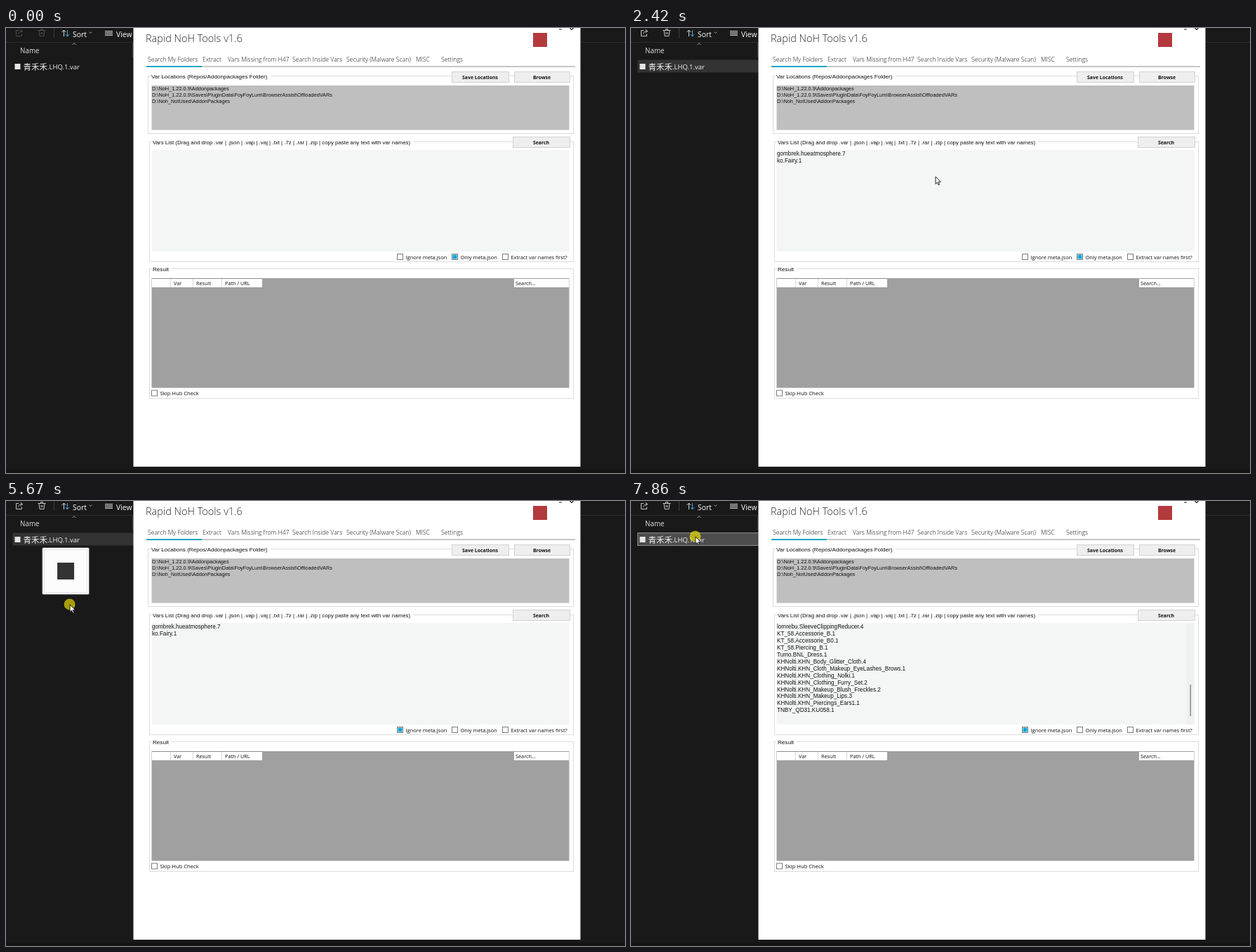
An HTML page for the animation above (8 s loop, 882 by 635 pixels).

```html
<!DOCTYPE html>
<html lang="en">
<head>
<meta charset="utf-8">
<title>Var search</title>
<style>
html, body { margin: 0; width: 100%; height: 100%; overflow: hidden; background: #191919; }
svg { display: block; width: 882px; height: 635px; }
text { white-space: pre; }
.ui { font-family: "Open Sans", "Noto Sans", sans-serif; }
.thin { font-family: "Open Sans", "Noto Sans", sans-serif; font-weight: 300; }
.bold { font-family: "Open Sans", "Noto Sans", sans-serif; font-weight: 700; }
.sans { font-family: "Liberation Sans", Arial, sans-serif; }
.cjk { font-family: "Noto Sans CJK SC", "Noto Sans CJK", "Noto Sans CJK JP", sans-serif; }
</style>
</head>
<body>
<svg id="stage" viewBox="0 0 882 635"></svg>
<script>
const LOOP = 8000;
const stage = document.getElementById('stage');

function add(tag, attrs, parent = stage) {
  const el = document.createElementNS('http://www.w3.org/2000/svg', tag);
  for (const k in attrs) el.setAttribute(k, attrs[k]);
  parent.appendChild(el);
  return el;
}
const rect = (x, y, width, height, fill, more, parent) =>
  add('rect', { x, y, width, height, fill, ...more }, parent);
const line = (d, stroke, width = 1, parent) =>
  add('path', { d, stroke, 'stroke-width': width, fill: 'none' }, parent);
function text(x, y, str, size, cls, fill = '#111', more, parent) {
  const el = add('text', { x, y, 'font-size': size, class: cls, fill, ...more }, parent);
  el.textContent = str;
  return el;
}
const show = (el, on) => el.setAttribute('visibility', on ? 'visible' : 'hidden');

// File manager
rect(0, 0, 882, 635, '#191919');
rect(0, 630, 882, 5, '#141414');
line('M818 20.5H882M0 20.5H182', '#2a2a2a');
line('M68.5 0V14M180.5 21V42', '#3c3c3c');
const tools = add('g', { fill: 'none', 'stroke-width': 1 });
add('path', { d: 'M18 3.5H14.5V11.5H22.5V8.5M17.5 8.5Q18 4.5 23.5 4.5M20.5 2L23.5 4.5L20.5 7' }, tools);
add('path', { d: 'M45.5 3.5H56.5M47 3.5L48 11.5H54L55 3.5M49.5 3V1.5H52.5V3M50 6V9M52 6V9' }, tools);
line('M82.5 12V3M79.5 6L82.5 3L85.5 6', '#d8d8d8');
line('M87.5 3V12M84.8 9L87.5 12L90.2 9', '#4aa3e0');
line('M118.5 5.5L120.5 7.5L122.5 5.5M94.5 24L97 21.5L99.5 24', '#a0a0a0');
line('M141 4.5H152M141 6.5H152M141 8.5H152M141 10.5H152', '#d0d0d0');
text(95, 12.5, 'Sort', 10.4, 'ui', '#fff');
text(157, 12.5, 'View', 10.4, 'ui', '#fff');
text(20, 36, 'Name', 9.9, 'ui', '#dedede');
const row = rect(9.5, 45.5, 175, 18, '#333');
rect(12.5, 51, 8, 8, '#e6e6e6');
text(24.5, 59.5, '青禾禾', 11.5, 'cjk', '#f2f2f2');
text(59, 59.3, '.LHQ.1.var', 9.5, 'ui', '#f2f2f2');

// Application window
rect(181.5, 0, 637, 626, '#fff');
text(199, 20, 'Rapid NoH Tools v1.6', 14.5, 'thin', '#222');
rect(751, 7, 20, 20, '#b3393d');
line('M788 2H792M803.5 0L806 2.5L808.5 0', '#222', 1.2);
const tabs = [[202, 'Search My Folders'], [280, 'Extract'], [316, 'Vars Missing from H47'],
  [408, 'Search Inside Vars'], [485, 'Security (Malware Scan)'], [584, 'MISC'], [620, 'Settings']];
for (const [x, name] of tabs) text(x, 47.6, name, 8.7, 'thin', '#111');
rect(200, 54, 611, 2, '#c6c6c6');
rect(200, 54, 79, 2, '#14a5c4');

function group(x, y, w, h, label, labelWidth, size = 8.1) {
  rect(x + .5, y + .5, w, h, 'none', { stroke: '#dcdcdc' });
  rect(x + 4, y - 4, labelWidth, 9, '#fff');
  text(x + 5, y + 4, label, size, 'sans');
}
function button(x, y, w, label) {
  rect(x + .5, y + .5, w, 15, '#eeeeee', { stroke: '#d2d2d2' });
  text(x + w / 2, y + 11.3, label, 6.9, 'bold', '#111', { 'text-anchor': 'middle' });
}
function checkbox(x, y, label, size) {
  const box = rect(x + .5, y + .5, 8, 8, '#fff', { stroke: '#7a7a7a' });
  const mark = rect(x + 1.5, y + 1.5, 6, 6, '#0da7d8');
  const name = text(x + 12.5, y + 7.6, label, size, 'ui');
  return (on, hover = false) => {
    show(mark, on);
    box.setAttribute('stroke', hover ? '#444' : '#7a7a7a');
    name.setAttribute('fill', hover ? '#a0a0a0' : '#111');
  };
}

group(202, 68, 606, 82, 'Var Locations (Repos/Addonpackages Folder)', 171);
rect(207.5, 82, 595, 63.5, '#bfbfbf');
['D:\\NoH_1.22.0.9\\Addonpackages',
 'D:\\NoH_1.22.0.9\\Saves\\PluginData\\FoyFoyLum\\BrowserAssist\\OffloadedVARs',
 'D:\\Noh_NotUsed\\AddonPackages'
].forEach((s, i) => text(208, 89.4 + i * 8.6, s, 7.36, 'sans'));
button(635, 62, 81, 'Save Locations');
button(724, 62, 79, 'Browse');

group(204, 162, 604, 171, 'Vars List (Drag and drop .var | .json | .vap | .vaj | .txt | .7z | .rar | .zip | copy paste any text with var names)', 372, 7.9);
rect(207.5, 174, 595, 145, '#f4f6f6');
button(722, 155, 81, 'Search');
const ignore = checkbox(557, 322, 'Ignore meta.json', 7.48);
const only = checkbox(635, 322, 'Only meta.json', 7.48);
const extract = checkbox(707, 322, 'Extract var names first?', 7.4);

group(204, 343, 604, 185, 'Result', 28);
rect(207.5, 357, 595, 156.5, '#a0a0a0');
rect(208, 358, 157, 12, '#fff');
line('M234.5 358V370M266.5 358V370M307.5 358V370', '#d8d8d8');
line('M208 357.5H365', '#8c8c8c');
[[239, 'Var'], [271, 'Result'], [312, 'Path / URL']].forEach(([x, s]) => text(x, 367, s, 7.3, 'ui'));
rect(724, 358, 78, 12, '#fff');
text(726, 367, 'Search...', 7.3, 'ui');
const skip = checkbox(207, 516.5, 'Skip Hub Check', 7.65);
extract(false);
skip(false);

// Contents of the vars list
const first = ['gombrek.hueatmosphere.7', 'ko.Fairy.1'];
const rest = ['lomrebu.SleeveClippingReducer.4', 'KT_58.Accessorie_B.1', 'KT_58.Accessorie_B0.1',
  'KT_58.Piercing_B.1', 'Tumo.BNL_Dress.1', 'KHNolti.KHN_Body_Glitter_Cloth.4',
  'KHNolti.KHN_Cloth_Makeup_EyeLashes_Brows.1', 'KHNolti.KHN_Clothing_Nolki.1',
  'KHNolti.KHN_Clothing_Furry_Set.2', 'KHNolti.KHN_Makeup_Blush_Freckles.2',
  'KHNolti.KHN_Makeup_Lips.3', 'KHNolti.KHN_Piercings_Ears1.1', 'TNBY_QD31.KU058.1'];
const PITCH = 9.9;
const rows = Array.from({ length: 14 }, (_, i) => text(208, 182.4 + i * PITCH, '', 8.16, 'sans'));
const bar = rect(792, 174, 10.5, 145, '#eff0f0');
const thumb = rect(796.5, 262, 1.5, 45, '#8a8a8a');
const caret = rect(208, 174, 1.5, 10, '#111');

// Drag card and pointer
const card = add('g', {});
rect(-33.5, -33.5, 67, 67, '#fff', { rx: 2, stroke: '#555' }, card);
rect(-30.5, -30.5, 61, 61, '#fcfcfc', { stroke: '#e4e4e4' }, card);
rect(-12, -12, 24, 24, '#333', {}, card);
const pointer = add('g', {});
const glow = add('circle', { cx: -.5, cy: -.5, r: 8, fill: '#fff000', 'fill-opacity': .62 }, pointer);
add('path', { d: 'M0 0V10.5L2.4 8.3L4 12L5.6 11.3L4 7.7H7.4Z', fill: '#fff', stroke: '#111', 'stroke-width': .9 }, pointer);
const dropBox = rect(2.5, 10.5, 8, 6, '#fff', { rx: 1, stroke: '#333' }, pointer);

// time, x, y
const path = [[390, 818, 604], [700, 560, 330], [960, 180, 95], [1150, 90, 55], [1220, 90, 56],
  [1350, 108, 170], [1490, 183, 291], [1620, 255, 308], [1800, 370, 265], [1960, 433, 205],
  [2050, 434, 212], [2420, 434, 212], [2800, 560, 280], [3180, 657, 321], [3300, 660, 328],
  [3640, 660, 328], [4040, 595, 327], [4310, 595, 327], [4640, 589, 326], [4840, 589, 326],
  [5150, 380, 200], [5430, 110, 62], [5560, 90, 56], [5670, 91, 147], [5780, 120, 250],
  [5880, 190, 292], [5990, 285, 255], [6090, 338, 211], [7310, 338, 211], [7700, 130, 75],
  [7840, 92, 51], [8000, 92, 51]];

// Slope at a key; resting keys get none
function slope(i, c) {
  const a = path[i - 1], p = path[i], b = path[i + 1];
  if (!a || !b || a[c] === p[c] || b[c] === p[c]) return 0;
  return (b[c] - a[c]) / (b[0] - a[0]);
}
function pointAt(t) {
  let i = path.findIndex(p => p[0] > t) - 1;
  if (i < 0) i = 0;
  const a = path[i], b = path[i + 1], span = b[0] - a[0];
  const u = Math.max(0, (t - a[0]) / span), v = 1 - u;
  return [1, 2].map(c =>
    a[c] * (1 + 2 * u) * v * v + b[c] * u * u * (3 - 2 * u) +
    span * (slope(i, c) * u * v * v - slope(i + 1, c) * u * u * v));
}

const within = (t, spans) => spans.some(([a, b]) => t >= a && t < b);
const drags = [[1220, 2090], [5600, 6370]];
let filled = -1;

function fillList(state) {
  if (state === filled) return;
  filled = state;
  const lines = [[], first, first.concat(rest), rest][state];
  rows.forEach((el, i) => { el.textContent = lines[i] || ''; });
  show(bar, state > 1);
  show(thumb, state > 1);
  thumb.setAttribute('y', state === 2 ? 186 : 262);
}

function draw(t) {
  const [x, y] = pointAt(t);
  const drag = drags.find(([a, b]) => t >= a && t < b);
  const overList = x > 208 && x < 803 && y > 174 && y < 319;

  tools.setAttribute('stroke', t < 1220 ? '#4c4c4c' : '#c4c4c4');
  const focus = t >= 7750 || within(t, [[1150, 1220], [5480, 5600]]);
  show(row, t >= 1060);
  row.setAttribute('fill', focus ? '#4d4d4d' : t < 1150 ? '#2b2b2b' : '#333');
  row.setAttribute('stroke', focus ? '#8c8c8c' : 'none');

  const overIgnore = x > 556 && x < 630 && y > 320 && y < 333;
  const overOnly = x > 634 && x < 702 && y > 320 && y < 333;
  ignore(t >= 4310, overIgnore);
  only(t < 4310, overOnly);

  fillList(t < 2420 ? 0 : t < 6640 ? 1 : t < 7040 ? 2 : 3);
  const caretRow = t < 2420 ? 0 : t < 6640 ? 2 : 13;
  show(caret, (drag && overList) || within(t, [[7040, 7400]]));
  caret.setAttribute('y', 174 + caretRow * PITCH);

  show(pointer, t >= 390);
  pointer.setAttribute('transform', `translate(${x} ${y})`);
  const pressed = drag || within(t, [[4110, 4380], [5500, 5600], [7780, 8000]]);
  glow.setAttribute('visibility', pressed ? 'inherit' : 'hidden');
  dropBox.setAttribute('visibility', drag && overList ? 'inherit' : 'hidden');

  show(card, drag && t > drag[0] + 50 && !overList);
  if (drag) {
    const k = Math.min(1, Math.max(0, (t - drag[0] - 70) / 200));
    card.setAttribute('transform', `translate(${x - 6 - 6 * k} ${y - 48 + 16 * k})`);
  }
}

const start = performance.now();
function tick() {
  draw((performance.now() - start) % LOOP);
  requestAnimationFrame(tick);
}
draw(0);
requestAnimationFrame(tick);
</script>
</body>
</html>
```
